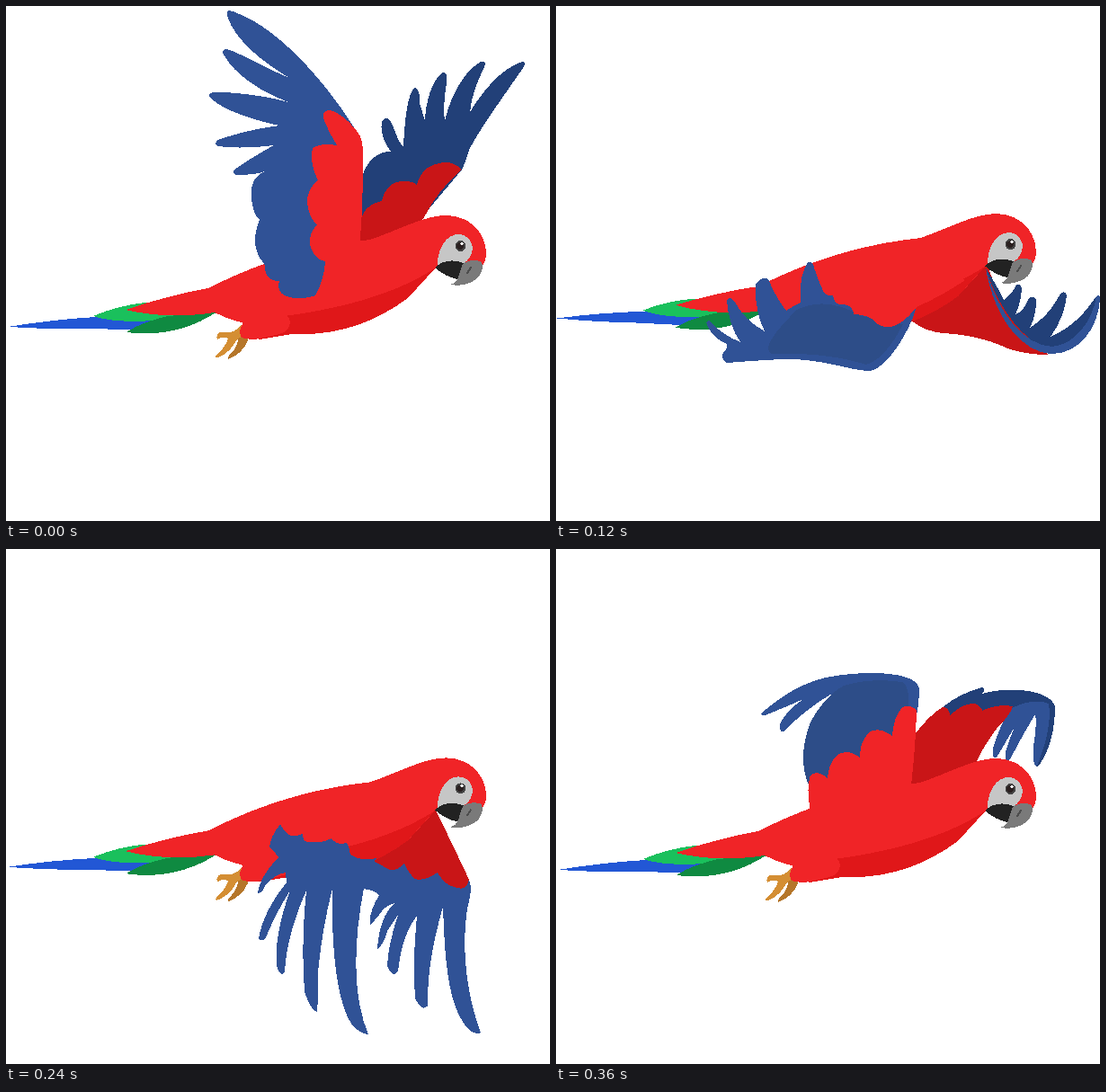
Write an HTML page that moves like this. It is 605 px wide and 573 px high and loops after 400 ms.

```html
<!DOCTYPE html>
<html lang="en">
<head>
<meta charset="utf-8">
<title>Flying parrot</title>
<style>
html, body { margin: 0; width: 100%; height: 100%; overflow: hidden; background: #fff; }
svg { display: block; width: 100vw; height: 100vh; shape-rendering: crispEdges; }
</style>
</head>
<body>
<svg viewBox="0 0 605 573">
  <g id="far"></g>
  <g id="body">
    <g id="tail">
      <path fill="#2257d5" d="M2,357Q50,349 100,346L165,348V358Q140,361 100,359Q50,360 2,357z"/>
      <path fill="#1ac05c" d="M97,345Q125,333 155,330L235,335 165,350Q120,353 97,345z"/>
      <path fill="#0f8a41" d="M134,363Q150,352 180,345L235,340Q190,370 134,363z"/>
      <path fill="#f02427" d="M133,338Q180,322 225,314L250,330 232,341Q180,349 133,338z"/>
    </g>
    <path fill="#b5762a" d="M271,366Q266,386 247,393Q246,390 250,387Q257,380 259,367z"/>
    <path fill="#d48e33" d="M262,355Q256,362 249,363L238,363Q233,366 235,371Q241,367 247,370Q244,380 234,388Q232,392 236,391Q250,385 256,372L264,366z"/>
    <path fill="#f02427" d="M223,315Q310,270 405,260C440,248 465,233 490,233C515,233 534,252 534,276Q534,284 528,291L505,292 478,291 447,325C410,352 370,367 318,365L282,371 262,352Q245,348 230,340z"/>
    <path fill="#e01719" d="M478,291Q466,303 447,325C410,352 370,367 318,365L280,371 310,345Q420,330 478,291z"/>
    <path fill="#f02427" d="M268,344L312,344C318,347 317,358 310,363Q298,367 282,370Q272,372 262,369Q257,360 266,350z"/>
    <path fill="#c6c6c6" d="M480,290C479,270 490,254 503,254C513,254 519,262 519,270Q518,281 508,287Q495,282 480,290z"/>
    <path fill="#222" d="M477,291Q490,279 509,286Q510,293 502,304Q488,301 477,291z"/>
    <path fill="#7a7a7a" d="M508,287Q516,281 528,284Q533,291 525,302Q513,313 494,310Q501,308 503,302Q505,294 508,287z"/>
    <path fill="none" stroke="#4d4d4d" stroke-width="2" stroke-linecap="round" d="M513,297L517,291"/>
    <circle cx="505.5" cy="267" r="6" fill="#444"/>
    <circle cx="505" cy="267" r="3.8" fill="#2a2020"/>
    <circle cx="507" cy="264.5" r="1.7" fill="#fff"/>
  </g>
  <g id="near"></g>
</svg>
<script>
const STEP = 40, COUNT = 10;
const RED = '#f02427', SHADE = '#c91517', UNDER = '#d8191b';
const BLUE = '#305296', INNER = '#2d4d88', NAVY = '#224078';
const $ = id => document.getElementById(id);

// Blend two wings whose outlines share the same commands
function mix(a, b, k) {
  return a.map(([color, d], i) => {
    const to = b[i][1].match(/[\d.]+/g);
    let n = 0;
    return [color, d.replace(/[\d.]+/g, v => +v + (to[n++] - v) * k)];
  });
}

const up = {
  far: [
    [NAVY, 'M394,262L396,190Q405,162 428,162C418,150 414,130 421,125Q427,123 432,138Q437,152 442,157C443,130 447,93 455,91Q461,93 460,108L466,128C466,110 474,80 486,74Q493,74 489,92Q486,112 488,128C494,100 510,72 528,62Q535,60 532,68Q518,95 516,118C530,95 550,70 574,62Q580,62 575,69C550,105 525,140 515,160Q512,172 507,182L440,262z'],
    [SHADE, 'M394,262L394,240Q398,221 418,217Q422,200 434,196Q450,193 457,199Q462,180 478,176Q495,170 507,182Q480,205 465,235L440,262z']
  ],
  near: [
    [BLUE, 'M393,145C370,105 310,25 252,6Q244,3 246,11C255,40 290,65 315,80C290,70 260,52 246,48Q239,48 242,54C256,80 290,98 314,107C290,100 250,95 230,96Q223,98 228,103C245,118 280,128 304,133C280,136 255,142 236,149Q230,153 236,156C260,159 280,157 298,155C285,162 268,172 254,182Q251,187 257,188C268,188 280,187 288,184Q270,192 273,215Q275,232 282,238Q272,262 282,280Q290,290 288,293Q290,306 304,306Q300,320 315,324Q330,327 345,322L360,290 390,150z'],
    [RED, 'M394,145C385,130 370,118 360,116Q350,116 354,128Q360,142 368,155Q350,152 341,158Q338,170 343,185L347,194Q334,204 335,220Q338,238 346,243Q336,255 338,266Q343,282 355,284Q354,304 344,322L400,300 394,258Q397,220 397,175Q398,155 394,145z']
  ]
};

const high = {
  far: [
    [NAVY, 'M500,265L463,238Q460,236 460,232C457,224 462,215 468,215Q474,216 478,222Q482,227 486,234C482,215 477,190 486,184Q493,186 497,203L506,216C508,200 503,175 507,168Q514,166 520,182Q525,200 524,220C532,195 533,160 538,143Q545,139 550,150Q555,175 550,213C562,190 572,150 576,128Q582,124 583,135C586,180 570,225 555,255Q548,268 542,270L520,275z'],
    [SHADE, 'M500,270L500,262Q505,258 510,256Q515,252 520,250Q524,248 528,247Q533,243 538,244Q547,246 546,258Q543,266 536,272L510,280z']
  ],
  near: [
    [BLUE, 'M352,240C310,195 284,140 283,64Q280,50 274,60C258,90 256,130 263,172C248,150 240,110 241,84Q237,72 228,80C214,110 222,160 243,196C215,180 200,150 191,127Q186,118 182,128C182,165 200,195 222,219C205,212 192,202 180,187Q172,182 175,194C182,220 198,235 214,243C200,242 188,235 180,231Q175,230 178,237C185,253 200,262 214,265Q212,273 220,277Q222,287 236,291Q230,298 238,304Q250,310 258,309Q262,320 275,321Q300,318 320,319Q345,322 357,328L340,295 357,250z'],
    [RED, 'M357,245C350,234 335,229 322,232Q311,234 314,241Q320,252 331,257Q320,257 319,263Q321,272 327,280L333,290Q330,292 331,297Q332,305 337,310Q340,315 343,319Q348,324 352,326Q356,328 358,329L400,300 375,265Q365,267 362,267Q362,254 357,245z']
  ]
};

const level = {
  far: [
    [SHADE, 'M395,350Q410,362 430,364Q470,366 500,380Q520,388 548,388Q500,350 480,289L455,300 400,330z'],
    [NAVY, 'M478,292Q490,310 498,327Q508,320 512,310Q517,308 518,315Q517,330 511,343Q520,340 526,325Q531,322 534,326Q534,345 527,358Q548,345 561,320Q566,316 568,322Q566,345 550,368Q580,355 600,324L605,326Q600,365 575,380L550,386Q500,360 478,292z'],
    [BLUE, 'M478,291C490,340 520,378 552,379C577,377 597,350 601,323Q605,320 605,326C603,360 580,388 550,387C515,385 485,340 478,291z']
  ],
  near: [
    [BLUE, 'M401,335C392,365 368,402 350,406C325,406 300,392 250,393Q215,395 190,397Q182,392 187,384Q190,384 190,376Q172,368 167,352Q170,348 174,353Q185,366 205,374Q192,355 190,328Q193,322 198,328Q210,350 232,362Q221,340 222,310Q228,300 236,304Q245,325 256,339Q265,333 272,330Q270,300 280,285Q286,283 287,292L297,315 350,330z'],
    [INNER, 'M268,338Q300,322 340,345L386,354Q366,393 345,399Q300,385 240,387Q225,380 268,338z'],
    [RED, 'M290,300L297,317Q300,323 308,322Q310,333 318,332Q330,332 331,343Q350,344 355,352Q375,368 401,335Q430,322 455,305L400,275z']
  ]
};

const down = {
  far: [
    [BLUE, 'M388,388Q395,420 413,441Q420,440 424,432Q425,460 434,467Q440,465 441,452Q444,482 459,490Q464,478 462,464Q470,497 498,506Q497,495 485,478Q500,490 515,497Q530,505 548,502Q578,502 583,478Q578,475 574,484Q566,494 552,494L535,486Q515,470 503,440Q500,415 492,400L430,370z'],
    [NAVY, 'M534,486Q555,485 559,475Q563,480 557,492Q548,496 534,486z'],
    [SHADE, 'M388,387L400,325 457,300V312Q470,355 494,402Q490,422 480,420Q462,415 452,396Q442,404 432,403Q420,395 411,380Q402,390 388,387z']
  ],
  near: [
    [BLUE, 'M388,385C380,440 345,505 310,515C290,518 275,500 255,503C228,512 190,512 188,474Q190,468 195,474Q205,488 232,490Q220,475 221,460Q224,455 228,462Q235,480 250,480Q247,460 252,446Q256,445 260,456Q265,445 267,420Q273,400 275,382L264,394Q264,385 268,380L262,376Q270,362 281,349L300,340 380,360z'],
    [INNER, 'M288,360Q258,440 268,498Q300,510 330,485Q370,440 380,395L350,375z'],
    [RED, 'M232,338L262,350Q258,368 264,372Q275,365 281,349Q290,358 299,350Q298,370 306,372Q320,370 327,362Q326,384 333,385Q345,382 353,377Q352,410 360,417Q372,418 385,390Q398,365 403,326L440,305 400,270z']
  ]
};

const low = {
  far: [
    [BLUE, 'M392,378Q402,390 410,398Q404,415 408,430Q416,424 422,412Q428,410 433,408Q420,430 422,458Q429,452 433,438L443,420Q436,450 438,474Q445,486 450,478Q452,450 468,425Q466,465 474,500Q483,514 489,506Q484,460 494,425C502,470 515,510 545,522Q555,525 559,520C530,495 512,450 508,410Q512,390 506,383L440,350 395,360z'],
    [SHADE, 'M396,368L402,325 470,292Q485,340 506,384Q502,400 492,396Q475,392 467,378Q455,385 444,382Q432,376 427,364Q415,374 396,368z']
  ],
  near: [
    [BLUE, 'M290,328Q282,335 280,350Q280,358 280,365Q262,385 258,398Q266,398 272,388Q278,380 285,378Q245,420 235,452Q242,456 250,446Q262,420 280,405Q250,460 251,492Q257,504 263,496Q275,445 305,410Q285,470 287,520Q296,534 304,532Q304,500 312,470Q325,430 340,405C325,450 320,510 335,537Q345,545 354,540C352,500 370,450 392,385L395,375Q400,360 405,345L300,320z'],
    [RED, 'M250,335L283,340Q292,345 298,332Q300,350 305,350Q316,348 325,340Q328,358 336,358Q348,355 355,350Q360,378 370,380Q395,365 410,335L440,305 400,270z']
  ]
};

const spread = {
  far: [
    [BLUE, 'M398,378Q410,380 415,385Q403,405 405,418Q412,412 420,400Q428,395 432,394Q415,410 413,445Q420,440 424,425L436,407Q425,440 424,464Q430,478 436,470Q440,430 457,408Q452,455 455,500Q463,516 469,508Q468,460 486,398C488,450 490,510 515,535Q524,541 528,538C515,505 505,450 513,400Q520,375 514,367L440,340 400,350z'],
    [SHADE, 'M405,345L478,291Q495,325 515,368Q512,380 503,377Q488,375 480,360Q465,370 455,367Q447,360 443,350Q433,360 425,356z']
  ],
  near: [
    [BLUE, 'M305,306Q294,320 293,332Q300,338 303,343Q282,365 280,383Q285,383 288,375Q298,362 311,360L312,371Q285,405 281,434Q287,438 290,430Q300,405 316,380Q298,430 301,464Q306,478 310,470Q312,430 334,380Q328,440 332,492Q338,512 346,515Q348,490 347,470Q352,420 363,378C362,430 365,500 385,530Q396,540 403,540C388,505 384,450 398,377L400,365Q408,350 412,344Q395,348 383,340Q380,325 378,327Q368,330 362,322Q350,328 335,326Q330,325 330,317Q318,322 312,316Q308,312 305,306z']
  ]
};

const fold = {
  far: [
    [BLUE, 'M482,290Q482,340 465,390Q460,400 454,393Q446,370 450,325L448,322Q440,340 436,375Q430,388 425,380Q415,360 420,340L410,343Q412,360 410,368Q403,372 400,355L398,350 392,358 386,353 400,330z']
  ],
  near: [
    [SHADE, 'M412,256Q440,234 480,232L512,236Q517,240 515,243Q500,232 478,237Q440,247 412,256z'],
    [UNDER, 'M300,244L318,235 336,251 320,274Q312,256 300,244z'],
    [UNDER, 'M437,219Q432,240 415,265Q402,290 401,308Q396,318 380,317L355,315Q365,300 385,265Q405,225 437,219z'],
    [BLUE, 'M290,228C310,203 370,195 405,198Q430,200 442,207Q442,214 435,222Q405,235 385,275Q350,340 336,408Q330,417 324,408Q318,380 324,345Q335,300 349,268Q320,305 302,335Q292,360 293,377Q287,382 283,365Q278,340 292,312Q308,282 333,251Q290,290 263,330Q254,334 256,322Q262,290 285,268Q300,250 318,239Q285,243 258,272Q251,276 254,266Q262,248 295,235Q287,233 290,228z']
  ]
};

const lift = {
  far: [
    [BLUE, 'M455,210Q500,184 540,198Q552,205 549,225Q545,260 528,300L524,300Q520,280 530,250L500,240z'],
    [SHADE, 'M398,262Q420,225 460,208Q490,196 525,205Q505,225 485,240L440,265z']
  ],
  near: [
    [BLUE, 'M405,240Q424,200 425,178C410,160 340,162 305,172C275,183 250,205 236,230Q237,237 245,232Q262,215 290,203Q262,230 250,268Q252,275 259,268Q275,240 308,222Q285,255 277,298Q280,308 287,300Q298,265 335,240L395,260z'],
    [RED, 'M300,300Q290,290 300,280Q312,272 322,276Q325,255 340,250Q352,248 358,256Q362,232 378,225Q385,224 388,230Q395,205 412,198Q422,200 418,215Q405,250 400,290L380,320z']
  ]
};

const raise = {
  far: [
    [NAVY, 'M430,176Q450,160 474,154Q478,156 474,161Q500,154 525,158Q550,162 555,175Q555,215 537,241Q530,245 533,225L535,180 500,185 430,195z'],
    [BLUE, 'M505,178Q530,165 548,172Q552,200 535,241Q530,243 531,220Q535,195 533,184Q520,205 505,234Q498,238 500,225Q505,210 510,198Q500,215 490,232Q484,233 486,222Q492,200 505,178z'],
    [SHADE, 'M394,262Q396,230 400,205Q415,185 430,176Q438,176 438,186Q450,172 466,172Q474,176 474,180Q490,172 508,175Q505,185 490,200Q475,220 468,236L440,265z']
  ],
  near: [
    [BLUE, 'M398,200Q404,175 404,155C400,135 340,135 300,143C270,150 245,168 228,183Q229,187 235,184Q255,176 275,167Q256,180 249,195Q248,206 255,202Q275,180 305,162L380,220z'],
    [INNER, 'M282,265Q268,235 282,195Q297,165 320,152Q350,143 385,148Q394,153 392,180L350,260z'],
    [RED, 'M395,262Q400,220 401,180Q395,172 385,176Q375,188 374,208Q360,198 350,203Q338,212 338,232Q325,222 313,229Q303,238 302,255Q290,245 283,252Q278,265 283,292L300,310 390,300z']
  ]
};

const half = { far: mix(up.far, high.far, .5), near: mix(up.near, high.near, .5) };
const poses = [up, half, high, level, down, low, spread, fold, lift, raise];
const bob = [0, .5, .95, 1.05, .7, .55, .35, .1, .05, 0];

const draw = wing => wing.map(([color, d]) => `<path fill="${color}" d="${d}"/>`).join('');
let last = -1;

function render(time) {
  const i = Math.floor(time / STEP) % COUNT;
  if (i !== last) {
    last = i;
    $('far').innerHTML = draw(poses[i].far);
    $('near').innerHTML = draw(poses[i].near);
    $('body').setAttribute('transform', `translate(0 ${-1.8 * bob[i]})`);
    $('tail').setAttribute('transform', `rotate(${1.8 * bob[i]} 232 325)`);
  }
}

const start = performance.now();
function tick() {
  render(performance.now() - start);
  requestAnimationFrame(tick);
}
tick();
</script>
</body>
</html>
```
